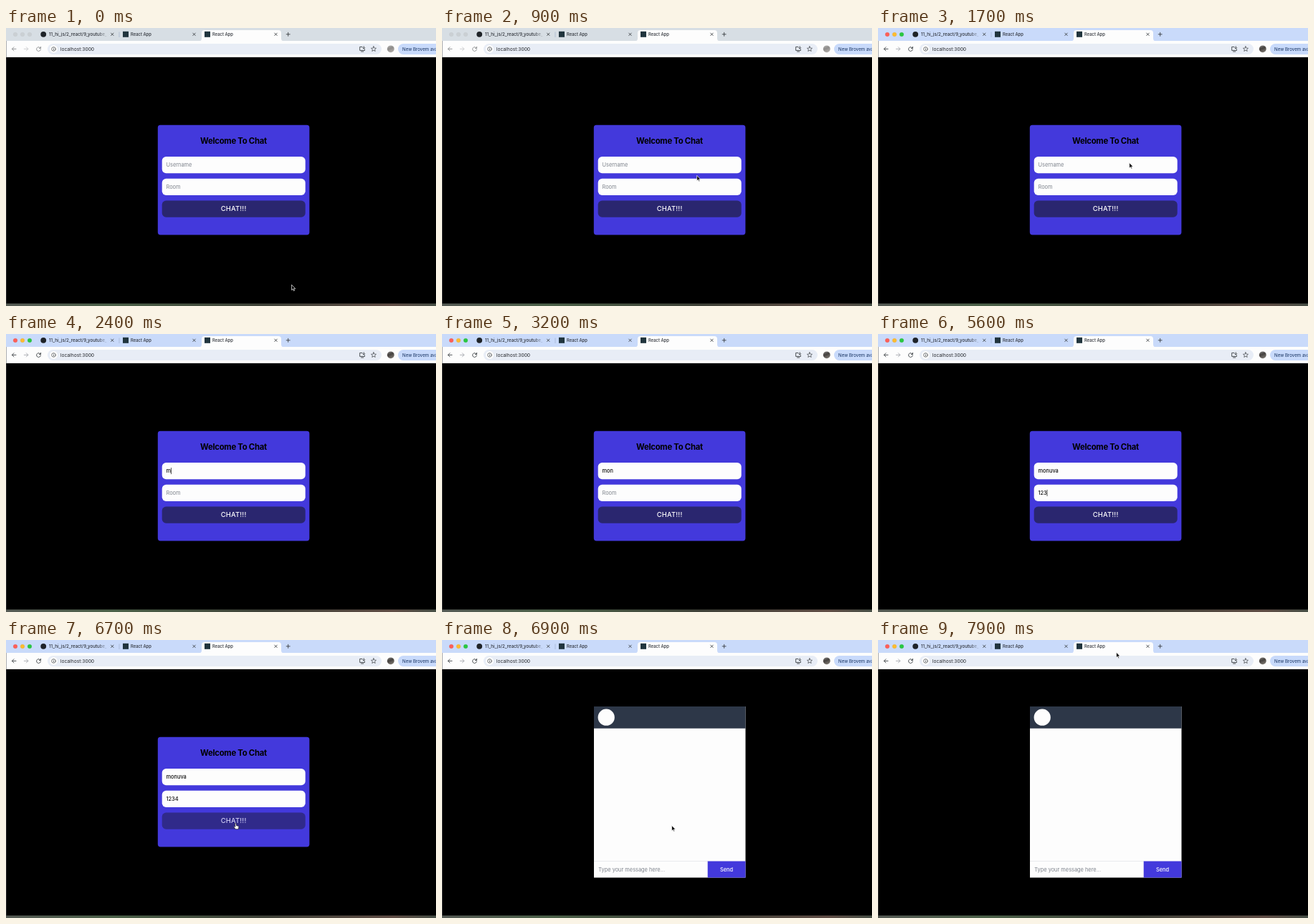
Write an HTML page that moves like this. It is 600 by 389 pixels and loops after 8000 ms.

```html
<!DOCTYPE html>
<html lang="en">
<head>
<meta charset="utf-8">
<title>Chat login</title>
<style>
  html, body { margin: 0; width: 100%; height: 100%; overflow: hidden; background: #000; }
  svg { display: block; width: 100%; height: 100%; font-family: Inter, Roboto, sans-serif; }
  text { white-space: pre; }
  .strip { fill: #c9dafa; }
  .idle .strip { fill: #d7dee4; }
  .idle .light { fill: #cbd0d4; stroke: #bfc4c9; }
  .idle .nav { opacity: .6; }
  .idle #avatar { opacity: .6; }
  .light { stroke-width: .3; }
  .icon { fill: none; stroke: #3c4043; stroke-width: .9; stroke-linecap: round; stroke-linejoin: round; }
  .tab { font-size: 5.85px; font-weight: 500; fill: #2b2f36; }
  .field { font-size: 7.4px; font-weight: 500; fill: #111; }
  .hint { font-size: 7.4px; fill: #7f848d; }
  .blue { fill: #4339dc; }
  .white { fill: #fdfdfd; }
</style>
</head>
<body>
<svg id="stage" viewBox="0 0 600 389" preserveAspectRatio="none">
  <defs>
    <linearGradient id="fade" gradientUnits="userSpaceOnUse" x1="128" x2="142">
      <stop stop-color="#2b2f36"/><stop offset="1" stop-color="#2b2f36" stop-opacity="0"/>
    </linearGradient>
    <linearGradient id="photo" x2=".4" y2="1">
      <stop stop-color="#8d8a88"/><stop offset=".5" stop-color="#45423f"/><stop offset="1" stop-color="#77716b"/>
    </linearGradient>
    <linearGradient id="desk">
      <stop stop-color="#565b55"/><stop offset=".25" stop-color="#4c6249"/>
      <stop offset=".6" stop-color="#3f4238"/><stop offset=".9" stop-color="#604d45"/>
      <stop offset="1" stop-color="#475046"/>
    </linearGradient>
  </defs>

  <rect width="600" height="389"/>
  <rect y="385.5" width="600" height="3.5" fill="url(#desk)"/>

  <!-- browser frame -->
  <rect class="strip" width="600" height="19"/>
  <rect class="white" y="18" width="600" height="22.9"/>
  <path class="white" d="M269 18.5Q273 18.5 273 14.5V7Q273 3 277 3H380Q384 3 384 7V14.5Q384 18.5 388 18.5Z"/>
  <circle class="light" cx="13" cy="9" r="2.8" fill="#fe5f57" stroke="#e2463f"/>
  <circle class="light" cx="23" cy="9" r="2.8" fill="#febc2e" stroke="#e0a028"/>
  <circle class="light" cx="33" cy="9" r="2.8" fill="#28c840" stroke="#1eac32"/>
  <circle cx="52.2" cy="8.8" r="3.9" fill="#1f2328"/>
  <text class="tab" x="60" y="10.9" style="fill:url(#fade);font-size:6.15px">11_hi_js/2_react/9_youtube_</text>
  <path d="M158 5.5V13" stroke="#98a8c6" stroke-width=".6"/>
  <rect x="163" y="4.8" width="8" height="8" fill="#20343d"/>
  <text class="tab" x="174" y="10.9">React App</text>
  <rect x="277" y="4.8" width="8" height="8" fill="#20343d"/>
  <text class="tab" x="288" y="10.9">React App</text>
  <g id="closers"></g>
  <path class="icon" d="M391.2 8.8H396.2M393.7 6.3V11.3"/>

  <g class="nav icon">
    <path d="M14 29.3H8.6M11 26.7L8.4 29.3 11 31.9"/>
    <path d="M25.3 29.3H30.7M28.3 26.7L30.9 29.3 28.3 31.9" stroke="#a5a8ad"/>
    <path d="M48.1 28.2A2.9 2.9 0 1 0 48.4 30M48.5 26.3V28.4H46.4"/>
  </g>
  <rect x="58" y="22" width="466" height="15" rx="7.5" fill="#e8edf6"/>
  <circle cx="66.5" cy="29.4" r="5.4" class="white"/>
  <circle class="icon" cx="66.5" cy="29.4" r="2.8" style="stroke-width:.7"/>
  <path class="icon" d="M66.5 29.3V30.7M66.5 28V28.1" style="stroke-width:.7"/>
  <text x="75.8" y="31.8" font-size="6.7" fill="#202328">localhost:3000</text>
  <path class="icon" d="M497 26.4H493.7V31.4H500.5V30M495.6 33H498.8M499.3 25.8V28.8M497.8 27.6L499.3 29.1 500.8 27.6"/>
  <path class="icon" d="M513 25.7L514 28.1 516.5 28.3 514.6 30 515.2 32.5 513 31.1 510.8 32.5 511.4 30 509.5 28.3 512 28.1Z" style="stroke-width:.7"/>
  <circle id="avatar" cx="536.8" cy="29.3" r="4.9" fill="url(#photo)"/>
  <rect x="547" y="22" width="70" height="15" rx="7.5" fill="#c8dafb"/>
  <text x="553" y="31.6" font-size="6.2" fill="#14305f">New Brovem available</text>
  <path d="M.3 18V386" stroke="#55585c" stroke-width=".6"/>

  <g id="login">
    <rect class="blue" x="211.8" y="135.8" width="211.6" height="153.6" rx="3.6"/>
    <text x="317.5" y="161.5" font-size="11.3" font-weight="700" letter-spacing="-.25" text-anchor="middle">Welcome To Chat</text>
    <rect class="white" x="217.7" y="180" width="200" height="23.2" rx="5.7"/>
    <rect class="white" x="217.7" y="210.8" width="200" height="23.2" rx="5.7"/>
    <text class="hint" id="userHint" x="223.5" y="194.3">Username</text>
    <text class="hint" id="roomHint" x="223.5" y="225.1">Room</text>
    <text class="field" id="user" x="223.5" y="194.3"></text>
    <text class="field" id="room" x="223.5" y="225.1"></text>
    <rect id="caret" width=".7" height="9" fill="#111"/>
    <g id="button">
      <rect x="217.7" y="241.5" width="200" height="23.2" rx="5.7" fill="#2a266f"/>
      <text x="317.6" y="256.2" font-size="9.4" font-weight="500" letter-spacing=".2" text-anchor="middle" fill="#fff">CHAT!!!</text>
    </g>
  </g>

  <g id="chat">
    <rect class="white" x="212" y="93" width="211.5" height="239.5"/>
    <rect x="212" y="93" width="211.5" height="30.7" fill="#2d3748"/>
    <circle class="white" cx="229.2" cy="108.2" r="11.6"/>
    <path d="M212 309.5H371" stroke="#dcdfe4" stroke-width=".6"/>
    <text class="hint" x="218.3" y="323.9">Type your message here...</text>
    <rect class="blue" x="370.7" y="309.5" width="52.8" height="23"/>
    <text x="397" y="323.9" font-size="7.4" font-weight="500" text-anchor="middle" fill="#fff">Send</text>
  </g>

  <g id="pointer" stroke-linejoin="round">
    <path id="arrow" d="M0 0V7.4L1.7 5.9 2.8 8.5 4 8 2.9 5.5H5.2Z" stroke="#fff" stroke-width=".7"/>
    <path id="beam" d="M-1.6 -3.5Q0 -3.5 0 -2.6Q0 -3.5 1.6 -3.5M0 -2.6V2.6M-1.6 3.5Q0 3.5 0 2.6Q0 3.5 1.6 3.5M-.8 .8H.8" fill="none" stroke="#222" stroke-width=".8"/>
    <path id="hand" d="M-1.1 -3Q-.3 -3.9 .4 -3L.8 .1 3.4 .7Q4.3 .9 4.2 2L3.6 5.1H-.2L-2.6 2.1Q-2.6 .9 -1.4 1.4L-.7 2Z" fill="#fff" stroke="#111" stroke-width=".6"/>
  </g>
</svg>
<script>
const LOOP = 8000, STEP = 100;
const $ = id => document.getElementById(id);
const show = (id, on) => { $(id).style.display = on ? "" : "none"; };

$("closers").innerHTML = [148.3, 262.5, 376.5].map(x =>
  `<path class="icon" d="M${x - 1.7} 7.1l3.4 3.4m0 -3.4l-3.4 3.4"/>`).join("");

const ACTIVE = 1300, CLICK_USER = 1900, CLICK_ROOM = 4500, CLICK_CHAT = 6600, JOINED = 6800;
const fields = {
  user: { value: "monuva", keys: [2300, 2500, 2700, 3300, 3500, 3700], focus: CLICK_USER, blur: CLICK_ROOM, top: 187.1 },
  room: { value: "1234", keys: [5000, 5200, 5400, 5700], focus: CLICK_ROOM, blur: CLICK_CHAT, top: 217.9 }
};

// time, x, y
const path = [
  [0, 398.6, 359.3], [100, 398.6, 359.3], [1100, 350.7, 188.6], [3900, 350.7, 188.6],
  [4400, 304.3, 216], [5900, 304.3, 216], [6400, 320.6, 259.6], [6900, 320.6, 259.6],
  [7800, 332.6, 17.2], [LOOP, 332.6, 17.2]
];
const hidden = [fields.user, fields.room].map((f, i) => [f.keys[0], [3900, 5900][i]]);

function pointerAt(t) {
  const i = path.findIndex((p, n) => n > 0 && t < p[0]);
  const [t0, x0, y0] = path[i - 1], [t1, x1, y1] = path[i];
  const k = (t - t0) / (t1 - t0), e = k * k * (3 - 2 * k);
  return [x0 + (x1 - x0) * e, y0 + (y1 - y0) * e];
}

function drawFields(t) {
  show("caret", false);
  for (const [id, f] of Object.entries(fields)) {
    const pressed = f.keys.filter(k => k <= t);
    const label = $(id);
    label.textContent = f.value.slice(0, pressed.length);
    show(id + "Hint", !pressed.length);
    if (t < f.focus || t >= f.blur) continue;
    const last = pressed.length ? pressed[pressed.length - 1] : f.focus;
    show("caret", (t - last) % 1000 < 500);
    $("caret").setAttribute("x", 223.4 + (pressed.length ? label.getComputedTextLength() : 0));
    $("caret").setAttribute("y", f.top);
  }
}

// The page reacts to the pointer only once its window has focus.
function drawPointer(t) {
  const [x, y] = pointerAt(t);
  const live = x > 218 && x < 418 && t >= CLICK_USER && t < JOINED;
  const overButton = live && y > 241.5 && y < 264.7;
  const overField = live && (y > 180 && y < 203.2 || y > 210.8 && y < 234);
  $("pointer").setAttribute("transform", `translate(${x} ${y})`);
  show("pointer", !hidden.some(([a, b]) => t >= a && t < b));
  show("hand", overButton);
  show("beam", overField);
  show("arrow", !overButton && !overField);
  $("button").style.opacity = overButton ? .75 : 1;
}

function draw(now) {
  const t = Math.floor(now % LOOP / STEP) * STEP;
  $("stage").classList.toggle("idle", t < ACTIVE);
  show("login", t < JOINED);
  show("chat", t >= JOINED);
  drawFields(t);
  drawPointer(t);
}

const start = performance.now();
function tick() {
  draw(performance.now() - start);
  requestAnimationFrame(tick);
}
tick();
</script>
</body>
</html>
```
